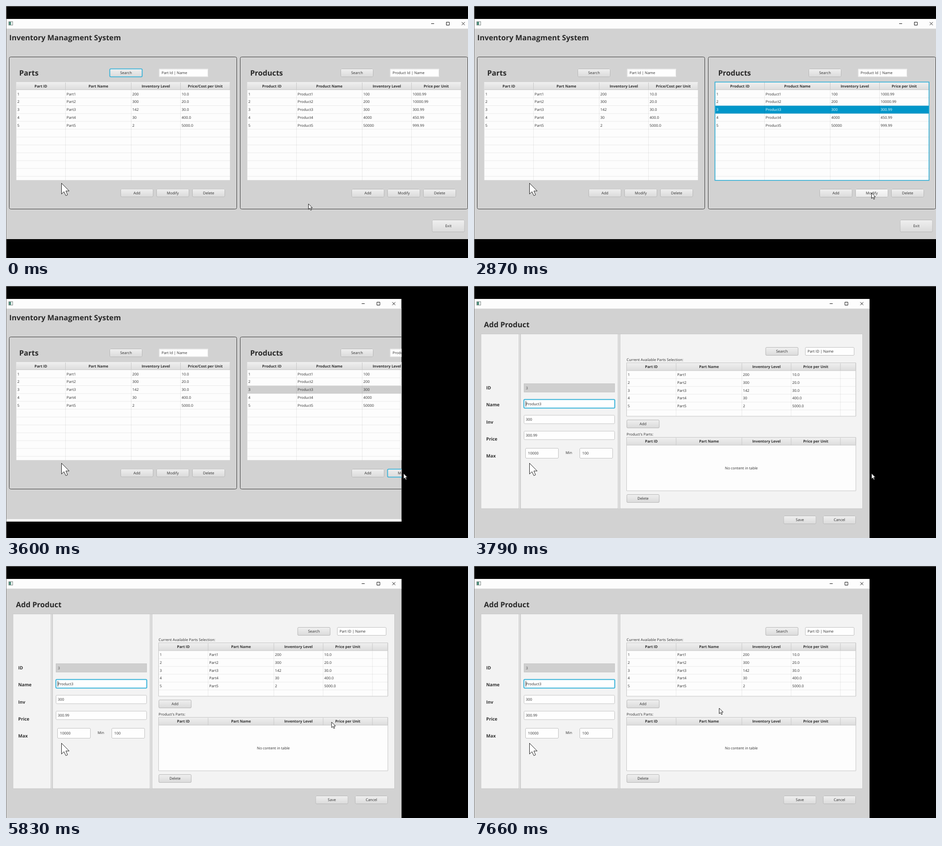
Recreate the animation shown at these times as an HTML page with a canvas. Size 928 px wide and 507 px high, loop 8 s.

```html
<!DOCTYPE html>
<html lang="en">
<head>
<meta charset="utf-8">
<title>Inventory</title>
<style>
  html, body { margin: 0; width: 100%; height: 100%; overflow: hidden; background: #000; }
  canvas { display: block; }
</style>
</head>
<body>
<canvas id="stage" width="928" height="507"></canvas>
<script>
const ctx = document.getElementById('stage').getContext('2d');
const LOOP = 8000;
const FONT = '"Open Sans", "Noto Sans", sans-serif';
const INK = '#303030', FOCUS = '#2fb0d8', SELECT = '#0096c9', GREY = '#d2d2d2';
const ROW = 15.8;

const PARTS = [
  ['1', 'Part1', '200', '10.0'],
  ['2', 'Part2', '300', '20.0'],
  ['3', 'Part3', '142', '30.0'],
  ['4', 'Part4', '30', '400.0'],
  ['5', 'Part5', '2', '5000.0']
];
const PRODUCTS = [
  ['1', 'Product1', '100', '1000.99'],
  ['2', 'Product2', '200', '10000.99'],
  ['3', 'Product3', '300', '300.99'],
  ['4', 'Product4', '4000', '450.99'],
  ['5', 'Product5', '50000', '999.99']
];

// Pointer stops: time, x, y
const POINTER = [
  [0, 607, 398], [360, 606, 372], [540, 606, 332], [720, 609, 285],
  [900, 615, 240], [1080, 621, 213],
  [2180, 640, 230], [2360, 690, 285], [2530, 750, 345], [2700, 792, 372], [2870, 798, 376],
  [3600, 798, 377], [5450, 788, 371], [5640, 725, 340], [5830, 653.5, 314],
  [6010, 610, 303], [6200, 570, 295], [6380, 535, 291],
  [6570, 518, 289], [6750, 504, 288], [6930, 496, 287], [7110, 492, 286]
];
const CARET_FLIPS = [4150, 4720, 5090, 5640, 6200, 6750, 7110, 7660];

function box(x, y, w, h, fill) {
  ctx.fillStyle = fill;
  ctx.fillRect(x, y, w, h);
}

function outline(x, y, w, h, color, r = 0, width = 1) {
  ctx.strokeStyle = color;
  ctx.lineWidth = width;
  ctx.beginPath();
  ctx.roundRect(x, y, w, h, r);
  ctx.stroke();
}

function text(str, x, y, { size = 7.4, bold = false, align = 'left', color = INK } = {}) {
  ctx.font = `${bold ? 'bold ' : ''}${size}px ${FONT}`;
  ctx.textAlign = align;
  ctx.fillStyle = color;
  ctx.fillText(str, x, y);
}

const title = (str, x, y) => text(str, x, y, { size: 14.9, bold: true, color: '#282828' });

function vertical(y, h, top, bottom) {
  const g = ctx.createLinearGradient(0, y, 0, y + h);
  g.addColorStop(0, top);
  g.addColorStop(1, bottom);
  return g;
}

function button(label, x, y, { h = 17, focus = false, hover = false } = {}) {
  const w = 66;
  ctx.fillStyle = hover ? vertical(y, h, '#fafafa', '#e9e9e9') : vertical(y, h, '#f0f0f0', '#dadada');
  ctx.beginPath();
  ctx.roundRect(x, y, w, h, 2);
  ctx.fill();
  outline(x + .5, y + .5, w - 1, h - 1, focus ? FOCUS : '#bababa', 2, focus ? 1.6 : 1);
  text(label, x + w / 2, y + h / 2 + 2.7, { size: 7.5, align: 'center' });
}

function field(value, x, y, w, h, { focus = false, off = false, pad = 4, edge = '#c4c4c4' } = {}) {
  box(x, y, w, h, off ? '#cfcfcf' : '#fefefe');
  if (focus) outline(x + .3, y + .3, w - .6, h - .6, FOCUS, 1.5, 1.8);
  else outline(x + .5, y + .5, w - 1, h - 1, off ? '#c8c8c8' : edge, 1.5);
  text(value, x + pad, y + h / 2 + 2.8, { color: off ? '#555' : INK });
}

function header(x, y, w, cols, names) {
  box(x, y, w, 16, vertical(y, 16, '#f0f0f0', '#dcdcdc'));
  box(x, y + 15.2, w, .8, '#c6c6c6');
  cols.forEach((c, i) => {
    if (i) box(x + c - .5, y + 1, 1, 15, '#c9c9c9');
    if (names[i]) text(names[i], x + (c + cols[i + 1]) / 2, y + 10.8, { bold: true, align: 'center' });
  });
}

function table(x, y, w, h, cols, names, rows, { picked = -1, active = false } = {}) {
  ctx.save();
  ctx.beginPath();
  ctx.rect(x, y, w, h);
  ctx.clip();
  box(x, y, w, h, '#fdfdfd');
  const top = y + 16;
  for (let k = 0; top + k * ROW < y + h; k++) {
    const ry = top + k * ROW;
    if (k === picked) box(x, ry, w, ROW, active ? SELECT : '#cfcfcf');
    box(x, ry + ROW - .6, w, 1, k === picked ? 'rgba(0,0,0,.06)' : '#ebebeb');
    (rows[k] || []).forEach((cell, i) =>
      text(cell, x + cols[i] + 2.3, ry + 10.5, { color: k === picked && active ? '#fff' : INK }));
  }
  cols.slice(1).forEach(c => box(x + c - .5, top, 1, h, 'rgba(0,0,0,.075)'));
  header(x, y, w, cols, names);
  ctx.restore();
}

function panel(x, name, cols, rows, opt) {
  outline(x - 13.5, 102.5, 457, 306, '#454545', 3);
  title(name + 's', x + 6.5, 140);
  button('Search', x + 188, 126, { focus: opt.search });
  field(name + ' Id | Name', x + 287.5, 126.5, 98.5, 16, { pad: 5, edge: '#e2e2e2' });
  table(x + .5, 153, 429.5, 197.5, [0, 99, 231, 330, 429.5], cols, rows, opt);
  if (opt.active) outline(x, 153, 430, 197.7, FOCUS, 0, 1.5);
  const y = opt.buttonY;
  button('Add', x + 210, y);
  button('Modify', x + 282, y, { hover: opt.hover, focus: opt.modify });
  button('Delete', x + 354, y);
}

function windowBar(right) {
  box(1, 26, right - 1, 19.5, '#fdfdfd');
  box(5, 31, 9, 8, '#8b9492');
  box(6, 32, 7, 6, '#eef1f0');
  box(6, 32, 4, 6, '#4f8f7d');
  const x = right - 80;
  ctx.strokeStyle = '#222';
  ctx.lineWidth = 1;
  ctx.beginPath();
  ctx.moveTo(x, 35.5);
  ctx.lineTo(x + 6, 35.5);
  ctx.rect(x + 30.5, 32.5, 6, 6);
  ctx.moveTo(x + 61.5, 32.5);
  ctx.lineTo(x + 67.5, 38.5);
  ctx.moveTo(x + 67.5, 32.5);
  ctx.lineTo(x + 61.5, 38.5);
  ctx.stroke();
}

function mainScene(t) {
  const small = t >= 3600;
  const right = small ? 794.5 : 934;
  ctx.save();
  ctx.beginPath();
  ctx.rect(1, 26, right - 1, 481);
  ctx.clip();
  box(1, 45, right, 424, GREY);
  if (small) box(1, 469, right, 5, '#fdfdfd');
  windowBar(right);
  title('Inventory Managment System', 6.5, 69.3);
  panel(20, 'Part', ['Part ID', 'Part Name', 'Inventory Level', 'Price/Cost per Unit'], PARTS,
    { search: t < 1260, buttonY: 367.5 });
  panel(484, 'Product', ['Product ID', 'Product Name', 'Inventory Level', 'Price per Unit'], PRODUCTS, {
    picked: t >= 1260 ? 2 : -1,
    active: t >= 1260 && t < 3430,
    hover: t >= 2700 && !small,
    modify: t >= 3430,
    buttonY: 368
  });
  if (!small) button('Exit', 855.5, 430, { h: 25 });
  ctx.restore();
}

function formScene(t) {
  box(1, 45, 793.5, 462, GREY);
  windowBar(794.5);
  title('Add Product', 20, 83);

  box(14, 97, 766, 351, '#f3f3f3');
  outline(14, 96.5, 766.5, 351.5, '#c9c9c9');
  for (const [x, w] of [[90, 4], [289, 4.5]]) {
    box(x, 97, w, 351, '#e6e6e6');
    box(x, 97, 1, 351, '#c0c0c0');
    box(x + w - 1, 97, 1, 351, '#b8b8b8');
  }

  ['ID', 'Name', 'Inv', 'Price', 'Max'].forEach((label, i) =>
    text(label, 24.5, 208 + i * 34.3, { size: 9, bold: true }));
  field('3', 100, 196, 183, 18, { off: true });
  field('Product3', 100, 228, 183, 18, { focus: true });
  field('300', 100, 259.5, 183, 18);
  field('300.99', 100, 291.5, 183, 18);
  field('10000', 103, 326, 67, 21, { pad: 5.5 });
  text('Min', 184, 337.8);
  field('100', 212, 326, 67, 21, { pad: 5.5 });
  if (CARET_FLIPS.filter(f => t >= f).length % 2 === 0) box(103.7, 231.5, 1, 11, '#333');

  button('Search', 585.5, 123);
  field('Part ID | Name', 665, 123, 99, 17, { pad: 5 });

  const cols = [0, 99.5, 231.5, 330.5, 429.5, 460];
  const names = ['Part ID', 'Part Name', 'Inventory Level', 'Price per Unit'];
  text('Current Available Parts Selection:', 306.5, 151);
  table(306.5, 154.5, 460.5, 107.5, cols, names, PARTS);
  outline(306.5, 154.5, 460.5, 107.5, '#c8c8c8');
  button('Add', 306.5, 269);

  text("Product's Parts:", 306.5, 301);
  box(306.5, 304.5, 460.5, 107.5, '#fdfdfd');
  header(306.5, 304.5, 460.5, cols, names);
  outline(306.5, 304.5, 460.5, 107.5, '#c8c8c8');
  text('No content in table', 537, 369, { align: 'center' });
  button('Delete', 306.5, 419);

  button('Save', 621.5, 462);
  button('Cancel', 701, 462);
}

function arrow(x, y, scale) {
  ctx.save();
  ctx.translate(x + .5, y);
  ctx.scale(scale, scale);
  ctx.beginPath();
  [[0, 0], [0, 16], [3.7, 12.6], [6.4, 18.4], [9, 17.2], [6.4, 11.5], [11.3, 11.5]]
    .forEach(p => ctx.lineTo(...p));
  ctx.closePath();
  ctx.fillStyle = '#fff';
  ctx.fill();
  ctx.strokeStyle = '#111';
  ctx.lineWidth = .9 / scale;
  ctx.stroke();
  ctx.restore();
}

function draw(t) {
  box(0, 0, 928, 507, '#000');
  if (t < 3790) mainScene(t);
  else formScene(t);
  box(0, 0, 928, 1, '#777');
  box(0, 0, 1, 507, '#888');
  arrow(111, 356.5, 1.36);
  const [, x, y] = POINTER.findLast(p => t >= p[0]);
  arrow(x, y, .7);
}

ctx.textRendering = 'geometricPrecision';
const start = performance.now();
function tick() {
  draw((performance.now() - start) % LOOP);
  requestAnimationFrame(tick);
}
tick();
</script>
</body>
</html>
```
